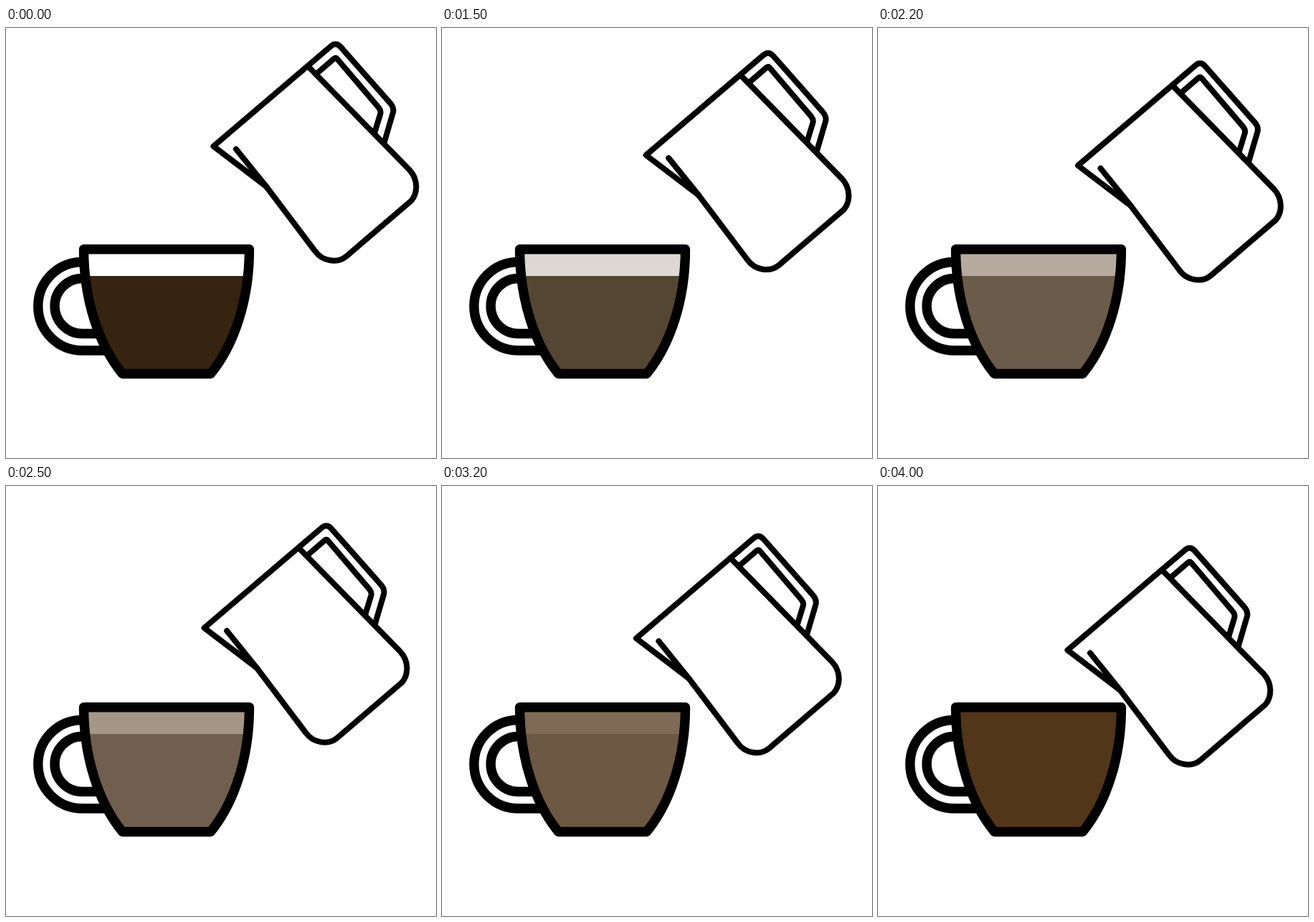
An HTML page that plays this animation: 600 by 600 pixels, repeating every 5 s.

```html
<!DOCTYPE html>
<html lang="en">
<head>
<meta charset="utf-8">
<title>Coffee and milk</title>
<style>
  html, body { margin: 0; height: 100%; overflow: hidden; background: #fff; }
  svg { display: block; width: 100vw; height: 100vh; }
  .line { fill: none; stroke: #000; stroke-linejoin: round; }
</style>
</head>
<body>
<svg viewBox="0 0 600 600">
  <defs>
    <path id="bowl" d="M108.5 308.7H339.5C339.5 380 318 443 285.5 482.5H162.5C130 443 108.5 380 108.5 308.7Z"/>
    <clipPath id="inside"><use href="#bowl"/></clipPath>
  </defs>

  <g class="line" stroke-width="13.4">
    <path d="M108 326.5H106.5A61.75 61.75 0 0 0 106.5 450H142"/>
    <path d="M108 349.5H106.5A38.5 38.5 0 0 0 106.5 426.5H130"/>
  </g>
  <use href="#bowl" fill="#fff"/>
  <use href="#bowl" id="mixed" fill="#52361a"/>
  <rect id="coffee" x="100" y="346" width="250" height="140" fill="#362410" clip-path="url(#inside)"/>
  <use href="#bowl" class="line" stroke-width="13.4"/>

  <g id="jug" class="line" stroke-width="8" stroke-linecap="round">
    <path d="M363 221L289.5 165L452 26.5Q460 18.5 467 26.5L535 103.5Q542 111 540 118L528 159"/>
    <path d="M421 53L563 198C575 211 575 230 565.5 241L475 318.5C463 328.5 442 326.5 431 311L363 221L321 169"/>
    <path d="M433 64L458 42.5Q460 41 462 43L520 111Q524 116 522 121L514 147"/>
  </g>
</svg>
<script>
  const LOOP = 5000, HOLD = 1000, STEP = 100, STEPS = 31;
  const [mixed, coffee, jug] = ['mixed', 'coffee', 'jug'].map(id => document.getElementById(id));

  function draw(now) {
    const step = Math.floor((now % LOOP - HOLD) / STEP) + 1;
    const progress = Math.min(Math.max(step, 0), STEPS) / STEPS;
    mixed.setAttribute('opacity', progress);
    coffee.setAttribute('opacity', 1 - progress);
    jug.setAttribute('transform', `translate(${-25 * progress} ${64 * progress})`);
  }

  function tick() {
    draw(performance.now());
    requestAnimationFrame(tick);
  }
  tick();
</script>
</body>
</html>
```
